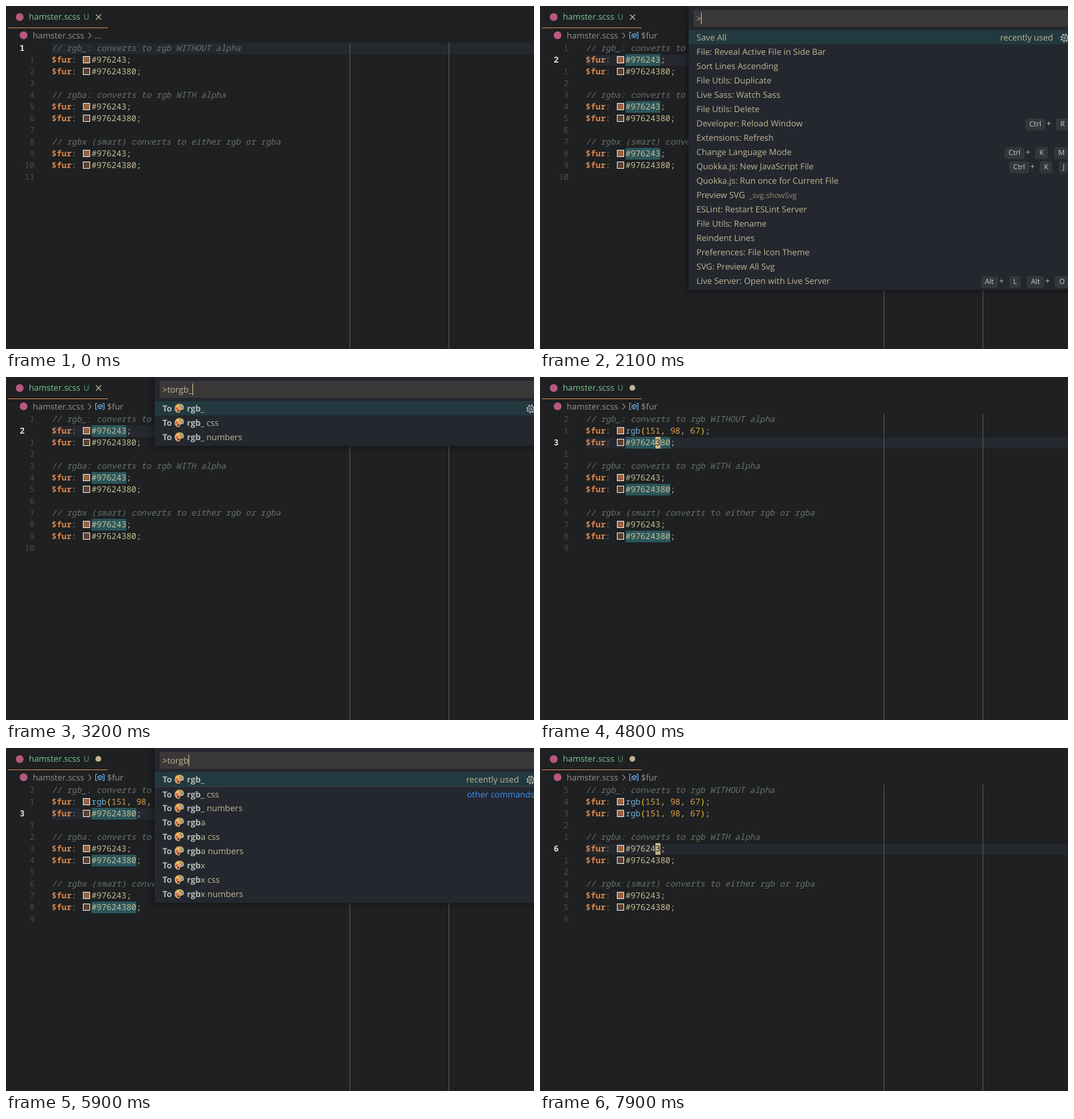
These frames come from a looping animation (810 px wide and 527 px high, 8 s). An HTML page:

```html
<!DOCTYPE html>
<html lang="en">
<head>
<meta charset="utf-8">
<title>Colour conversion in an editor</title>
<style>
html, body { margin: 0; width: 100%; height: 100%; overflow: hidden; background: #1e2021; }
#stage { position: absolute; left: 0; top: 0; width: 810px; height: 527px; overflow: hidden;
  font: 13px "Open Sans", sans-serif; text-rendering: geometricPrecision; }
#stage > svg { position: absolute; left: 0; top: 0; }
.code { font: 12.72px "Noto Sans Mono", monospace; white-space: pre; }
.comment { fill: #6b706f; font-style: italic; }
.palette { position: absolute; left: 228px; top: 0; width: 590px; padding: 37px 0 3px;
  background: #24272e; color: #c0b695; box-shadow: 0 0 8px 2px rgba(0,0,0,.4); }
.input { position: absolute; left: 8px; top: 6px; right: 0; height: 26px; padding-left: 4px;
  line-height: 26px; background: #3b3839; }
.caret { position: absolute; top: 4px; width: 1px; height: 18px; background: #d4c496; }
.row { position: relative; height: 22px; padding-left: 12px; line-height: 22px; white-space: pre; }
.row.active { background: #22393f; }
.row.split { height: 21px; border-top: 1px solid #3d4045; }
.row b { color: #b3bdb8; }
.row small { margin-left: 6px; font-size: 11.7px; opacity: .7; }
.row svg { vertical-align: -3px; }
.side { position: absolute; top: 0; right: 7px; }
.active .side { right: 31px; }
.split .side { color: #3794ff; }
.row .gear { position: absolute; left: 569px; top: 4px; }
kbd { display: inline-block; margin: 0 2px; padding: 3px 5px; border: 1px solid #383b40;
  border-radius: 3px; background: #33363b; color: #cbcac4; font: 11px/10px "Open Sans", sans-serif; }
kbd:last-child { margin-right: 0; }
kbd + kbd { margin-left: 8px; }
</style>
</head>
<body>
<div id="stage"></div>
<script>
const stage = document.getElementById('stage');
const LOOP = 8000, CHAR = 7.63, LEFT = 70, SWATCH = 15.5;

const rgb = 'rgb(151, 98, 67)', hex = '#976243', hexA = '#97624380';
const lines = (a, b) => [
  '// rgb_: converts to rgb WITHOUT alpha', a, b, '',
  '// rgba: converts to rgb WITH alpha', hex, hexA, '',
  '// rgbx (smart) converts to either rgb or rgba', hex, hexA, ''];

const recent = ['Save All', 'File: Reveal Active File in Side Bar', 'Sort Lines Ascending',
  'File Utils: Duplicate', 'Live Sass: Watch Sass', 'File Utils: Delete',
  'Developer: Reload Window~Ctrl+R', 'Extensions: Refresh', 'Change Language Mode~Ctrl+K M',
  'Quokka.js: New JavaScript File~Ctrl+K J', 'Quokka.js: Run once for Current File',
  'Preview SVG{_svg.showSvg}', 'ESLint: Restart ESLint Server', 'File Utils: Rename',
  'Reindent Lines', 'Preferences: File Icon Theme', 'SVG: Preview All Svg',
  'Live Server: Open with Live Server~Alt+L Alt+O'];
const toRows = ['Live Server: S*to*p Live Server~Alt+L Alt+C', 'ESLint: Fix all au*to*-fixable Problems',
  'Debug: *To*ggle Skipping this File', 'Terminal: Create New Terminal in Editor Area *to* the Side',
  'Debug: Attach *to* Node Process', 'Go *to* Previous Problem (Error, Warning, Info)',
  'Live Sass: S*to*p Watching', 'JSON *to* TS: Convert from clipboard~Ctrl+Shift+Alt+V',
  'Convert Indentation *to* Spaces',
  '|🖌 Material *T*heme Icons: Fix icons accent. Based *o*n Material Theme',
  'Add Cursors *To* Bottom', 'Add Cursors *to* Line Ends~Shift+Alt+I', 'Add Cursors *To* Top',
  'Add Selection *To* Next Find Match~Alt+D', 'Add Selection *To* Previous Find Match',
  'Add *to* Favorites', 'C/C++: Copy vcpkg install command *to* clipboard'];
const torRows = ['Terminal: Create New Terminal in Edi*tor* Area to the Side',
  '|Clear Command His*tor*y', 'Clear Edi*tor* His*tor*y', 'Close All Edi*tor*s',
  'Close Edi*tor* Group', 'Developer: Inspect Edi*tor* Tokens', 'File: Open Active Edi*tor* Folder',
  'Focus Active Edi*tor* Group', 'Join All Edi*tor* Groups', 'Keep Edi*tor*',
  'Move Edi*tor* Left', 'Move Edi*tor* Right', 'Pin Edi*tor*', 'Reopen Closed Edi*tor*',
  'Split Edi*tor*', 'Split Edi*tor* Down', 'Toggle Edi*tor* Layout'];

// Colour commands for each prefix, with the matched letters in bold
const colours = (kinds, match) => kinds.flatMap(k => ['', ' css', ' numbers'].map(end =>
  `*To* 🎨 *${match}*${k.slice(match.length)}${end}`));
const kinds = ['rgb_', 'rgba', 'rgbx'];
const split = ([first, second, ...rest]) => [first, '|' + second, ...rest];
const only = colours(['rgb_'], 'rgb_');

// Each entry: start time and what changes then
const script = [
  [0, { text: lines(hex, hexA), line: 0, col: 3, cursor: 0, crumb: 0, mark: '', dirty: 0, input: '', rows: [], recent: 1, caret: 1 }],
  [600, { line: 1, cursor: 1 }],
  [700, { crumb: 1 }],
  [1000, { col: 4 }],
  [1200, { col: 12 }],
  [1400, { mark: hex }],
  [1700, { cursor: 0 }],
  [2100, { input: '>', rows: recent }],
  [2600, { input: '>to', rows: [...toRows, 'C/C++: Go *to* next directive in conditional group'] }],
  [2700, { input: '>torg', rows: [...colours(kinds, 'rg'), 'View: Move Editor in*to* *R*ight *G*roup'], recent: 0 }],
  [3000, { input: '>torgb', rows: colours(kinds, 'rgb') }],
  [3200, { input: '>torgb_', rows: only }],
  [3800, { caret: 0 }],
  [4200, { input: '', cursor: 1 }],
  [4300, { text: lines(rgb, hexA), mark: '', dirty: 1 }],
  [4600, { line: 2 }],
  [4800, { mark: hexA }],
  [5100, { input: '>', rows: ['To 🎨 rgb_', ...recent.slice(0, 17)], cursor: 0, caret: 1, recent: 1 }],
  [5500, { input: '>to', rows: ['*To* 🎨 rgb_', ...toRows] }],
  [5600, { input: '>tor', rows: ['*To* 🎨 *r*gb_', ...torRows] }],
  [5900, { input: '>torgb', rows: split(colours(kinds, 'rgb')) }],
  [6200, { input: '>torgb_', rows: split(only) }],
  [6800, { caret: 0 }],
  [7100, { input: '', text: lines(rgb, rgb), mark: '', cursor: 1 }],
  [7600, { line: 3, col: 0 }],
  [7700, { line: 4, col: 12 }],
  [7900, { line: 5 }]
];
let last = {};
const states = script.map(([at, change]) => last = { ...last, ...change, at });

const rect = (x, y, w, h, fill, more = '') => `<rect x="${x}" y="${y}" width="${w}" height="${h}" fill="${fill}" ${more}/>`;
const label = (x, y, s, fill, more = '') => `<text x="${x}" y="${y}" fill="${fill}" ${more}>${s}</text>`;
const path = (d, stroke, width = 1) => `<path d="${d}" fill="none" stroke="${stroke}" stroke-width="${width}"/>`;
const dot = (x, y, r, fill) => `<circle cx="${x}" cy="${y}" r="${r}" fill="${fill}"/>`;
const icon = (body, cls = '') => `<svg class="${cls}" width="16" height="16">${body}</svg>`;

const paint = icon(
  '<path d="M8 1C3 1 .5 5 .7 9S4 15 7 15c3 0 1-3 3-4s5 0 5-4-3-6-7-6z" fill="#d9a066"/>' +
  dot(4, 8.5, 1.6, '#e64b3c') + dot(5.5, 4.5, 1.5, '#f5d547') + dot(9.5, 3.7, 1.5, '#63b84f') +
  dot(12.2, 6.8, 1.4, '#4a8fd8') + dot(6.3, 12, 1.4, '#24272e'));
const brush = icon(path('M14.5 1.5L8 9', '#3f9be8', 2.6) + path('M8.5 8.5L6.5 10.5', '#d5d9dc', 3.4) +
  '<path d="M5 9l3 3c-1 3-4 3-7 3 2-1 1-5 4-6z" fill="#a96a3c"/>');
const gear = icon('<circle cx="8" cy="8" r="5.6" fill="none" stroke="#c5c5bd" stroke-width="2" stroke-dasharray="2.2 2.2"/>' +
  '<circle cx="8" cy="8" r="4.4" fill="none" stroke="#c5c5bd"/><circle cx="8" cy="8" r="1.7" fill="none" stroke="#c5c5bd"/>', 'gear');

const isColour = s => /^(#|rgb)/.test(s);
const codeX = (s, col) => LEFT + col * CHAR + (isColour(s) && col > 5 ? SWATCH : 0);

function colourValue(s) {
  if (s[0] === '#') return s;
  return s.replace(/rgb|\d+|[()]/g, m => {
    const fill = m === 'rgb' ? '#6fb3dc' : /\d/.test(m) ? '#dfa04d' : '#f5cf2b';
    return `<tspan fill="${fill}">${m}</tspan>`;
  });
}

function codeLine(s, i, st) {
  const top = 56 + 18 * i, base = top + 13.4, away = Math.abs(i - st.line);
  let out = away ? label(44, base, away, '#4a4d4f', 'text-anchor="end"')
                 : label(21, base, i + 1, '#e4e4e0', 'font-weight="600"');
  if (!away) out += rect(LEFT, top + 1, 740, 17, '#25282f');
  if (isColour(s)) {
    const x = codeX(s, 6);
    if (s === st.mark) out += rect(x, top, s.length * CHAR, 18, '#2a565c');
    out += label(LEFT, base, '$fur<tspan fill="#93948c" font-weight="400">:</tspan>', '#dc8850', 'font-weight="600"');
    out += rect(118.5, top + 21 - 0.5, 10, 10, s === hexA ? '#5b4132' : '#976243', 'stroke="#eee" transform="translate(0 -0)"').replace(`y="${top + 20.5}"`, `y="${top + 21.5 - 0}"`).replace(`y="${top + 21.5}"`, `y="${top + 21.5 - 18 + 18 - 0}"`).replace(`y="${top + 21.5}"`, `y="${top + 3.5 + 18 - 18 + 0}"`).replace(`y="${top + 3.5}"`, `y="${top + 21.5 - 18}"`);
    out += label(x, base, colourValue(s) + ';', '#c9bc92');
  } else if (s) out += label(LEFT, base, s, '#6b706f', 'class="comment"');
  if (!away && st.cursor) {
    const x = codeX(s, st.col), full = isColour(s) ? `$fur: ${s};` : s;
    out += rect(x, top, CHAR, 18, '#c5b48a') + label(x, base, full[st.col] || '', '#1e2021');
  }
  return out;
}

function editor(st) {
  const sand = '#c2b68f', blue = '#75beff';
  let out = rect(0, 0, 810, 33, '#1f2022') + rect(3, 0, 153, 33, '#1e2021') + rect(3, 33, 153, 1, '#d98a4e');
  out += dot(21, 17, 6, '#b9587f') + dot(27, 45, 6, '#b9587f');
  out += label(35, 21, 'hamster.scss', '#73c991') + label(119, 21, 'U', '#5fa77a', 'font-size="12"');
  out += st.dirty ? dot(141.7, 16.7, 4.4, sand) : path('M138 13l8 8m0-8l-8 8', sand, 1.2);
  out += label(41, 50, 'hamster.scss', '#98938a') + path('M126.5 41l4 4.5-4 4.5', '#a19c92', 1.1);
  out += st.crumb
    ? path('M140 40.5h-2.5v9.500h2.500M148 40.500h2.500v9.500h-2.500', blue) +
      path('M141 44l4-2 3 1.500v3.500l-4 2-3-1.500zl3 1.500 4-2m-4 2v3.500', blue) +
      label(155, 50, '$fur', '#98938a')
    : label(136, 50, '...', '#98938a');
  out += `<g class="code">${st.text.map((s, i) => codeLine(s, i, st)).join('')}</g>`;
  out += [527, 679].map(x => rect(x, 56, 1, 471, '#5a5c5c')).join('');
  return `<svg width="810" height="527">${out}</svg>`;
}

function paletteRow(row, i, st) {
  const divided = row[0] === '|';
  const [name, keys] = row.replace('|', '').split('~');
  const html = name.replace(/\*(.+?)\*/g, '<b>$1</b>').replace(/\{(.+)\}/, '<small>$1</small>')
    .replace('🎨', paint).replace('🖌', brush);
  const chord = c => c.split('+').map(k => `<kbd>${k}</kbd>`).join('+');
  let side = keys ? keys.split(' ').map(chord).join('') : '';
  if (!i && st.recent) side = 'recently used';
  if (divided) side = 'other commands';
  return `<div class="row ${i ? '' : 'active'} ${divided ? 'split' : ''}">${html}` +
    `<span class="side">${side}</span>${i ? '' : gear}</div>`;
}

function palette(st) {
  if (!st.input) return '';
  const typed = st.input.replace('>', '&gt;');
  return `<div class="palette"><div class="input">${typed}${st.caret ? '<span class="caret"></span>' : ''}</div>` +
    st.rows.map((row, i) => paletteRow(row, i, st)).join('') + '</div>';
}

let shown;
function frame() {
  const t = performance.now() % LOOP;
  const st = states.findLast(s => s.at <= t);
  if (st !== shown) stage.innerHTML = editor(st) + palette(st);
  shown = st;
  requestAnimationFrame(frame);
}
frame();
</script>
</body>
</html>
```
